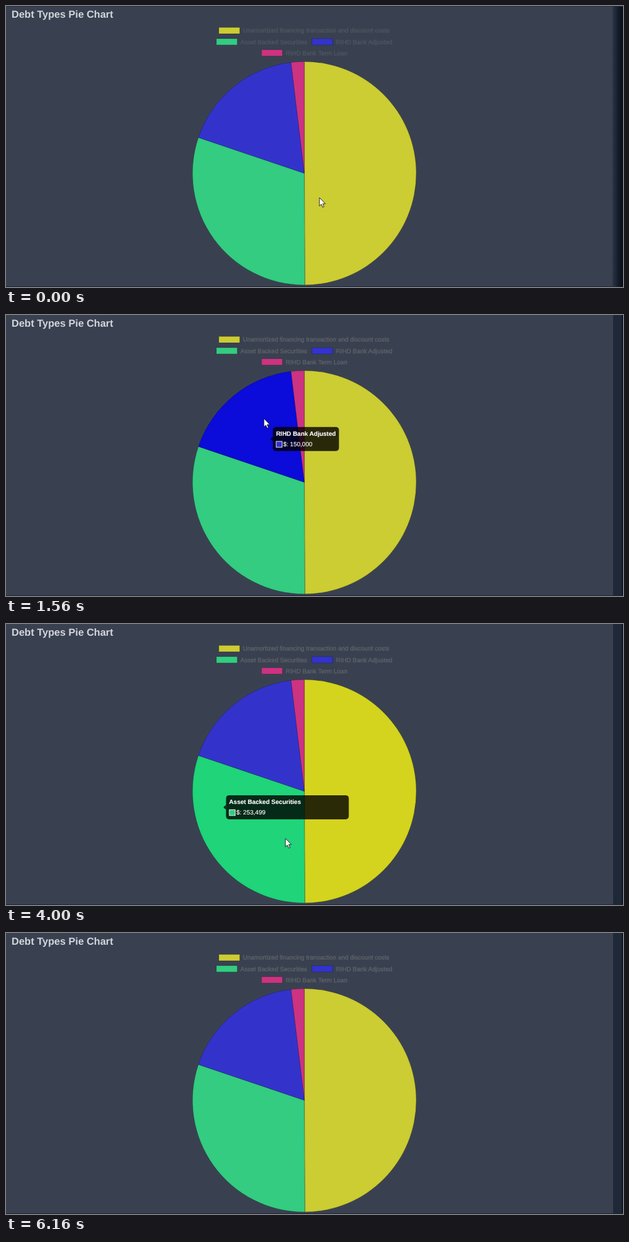
Animation, 1000 px wide and 456 px high, one loop 6700 ms. Source, as an HTML page:

```html
<!DOCTYPE html>
<html lang="en">
<head>
<meta charset="utf-8">
<title>Debt Types Pie Chart</title>
<style>
  html, body { margin: 0; width: 100%; height: 100%; overflow: hidden; background: #394151; }
  svg { display: block; width: 1000px; height: 456px; }
  text { font: 10.03px "Liberation Sans", Arial, sans-serif; text-rendering: geometricPrecision; }
  .heading { font-size: 16.5px; font-weight: bold; fill: #d3d6da; }
  .legend text { fill: #62666a; stroke: #62666a; stroke-width: .25; }
  .edge { stroke: #000; stroke-opacity: .24; stroke-width: .9; }
  .tip text { fill: #fff; stroke: #fff; stroke-width: .15; }
  .tip .name { font-weight: bold; }
</style>
</head>
<body>
<svg id="stage" viewBox="0 0 1000 456">
  <defs>
    <linearGradient id="shade">
      <stop offset="0" stop-color="#2b3444"/>
      <stop offset=".6" stop-color="#121a28"/>
      <stop offset="1" stop-color="#080d16"/>
    </linearGradient>
  </defs>
  <rect width="1000" height="456" fill="#394151"/>
  <rect x="984" width="16" height="456" fill="#1f2837"/>
  <rect x="998" width="2" height="456" fill="#0e1624"/>
  <rect y="455" width="1000" height="1" fill="#1c2431"/>
  <g id="soft">
    <rect x="983" width="17" height="456" fill="url(#shade)"/>
    <rect width="1000" height="1" fill="#262e3b"/>
  </g>
  <text class="heading" x="9" y="19.3">Debt Types Pie Chart</text>
  <g id="legend" class="legend"></g>
  <g id="pie"></g>
  <g id="tip" class="tip">
    <rect id="panel" height="39" rx="5" fill-opacity=".8"/>
    <path id="caret" fill-opacity=".8"/>
    <text id="name" class="name"></text>
    <rect id="swatch" width="9.6" height="9.6" stroke="#fff" stroke-width=".9"/>
    <text id="amount"></text>
  </g>
  <path id="cursor" d="M0 0V13.6L3.1 10.8 5.2 15.6 7.4 14.7 5.3 9.9H9.6Z"
        fill="#fff" stroke="#111" stroke-width=".9"/>
</svg>
<script>
const LOOP = 6700, CX = 483.6, CY = 271.5, R = 181.3, CARET = 4.2;
const $ = id => document.getElementById(id);

const slices = [
  { name: 'Unamortized financing transaction and discount costs', value: 418268, hue: 60, key: [345, 34.8] },
  { name: 'Asset Backed Securities', value: 253499, hue: 150, key: [341, 53] },
  { name: 'RIHD Bank Adjusted', value: 150000, hue: 240, key: [495.8, 53] },
  { name: 'RIHD Bank Term Loan', value: 15967, hue: 330, key: [414.2, 71] }
];

// start time, slice (-1 for none), duration
const hovers = [[110, 2, 190], [2208, 3, 400], [2909, 0, 400], [3939, 1, 400], [5280, -1, 400]];

// time, x, y of the pointer tip
const track = [
  [0, 508, 311], [110, 508, 311], [300, 430, 210], [970, 430, 210],
  [1560, 418, 168], [1660, 418, 168], [2208, 468, 144], [2260, 473, 144], [2340, 473, 144],
  [2909, 484, 144], [3120, 530, 144], [3510, 532, 250], [3790, 532, 250],
  [3939, 484, 330], [4000, 453, 348], [4460, 418, 344], [4670, 418, 344],
  [5220, 422, 425], [5330, 425, 462], [LOOP, 425, 462]
];

const lerp = (a, b, p) => a + (b - a) * p;
const clamp = v => Math.min(1, Math.max(0, v));
const easeOut = p => 1 - (1 - p) ** 4;
const tint = (hue, p) => `hsl(${hue} ${60 + 30 * p}% ${50 - 5 * p}%)`;

function add(parent, tag, attrs, text = '') {
  const el = document.createElementNS('http://www.w3.org/2000/svg', tag);
  set(el, attrs);
  el.textContent = text;
  return parent.appendChild(el);
}

function set(el, attrs) {
  for (const k in attrs) el.setAttribute(k, attrs[k]);
}

function polar(turn, r) {
  const a = turn * 2 * Math.PI;
  return [CX + r * Math.sin(a), CY - r * Math.cos(a)];
}

const total = slices.reduce((sum, s) => sum + s.value, 0);
let turn = 0;
for (const s of slices) {
  const span = s.value / total;
  const fill = tint(s.hue, 0);
  s.el = add($('pie'), 'path', {
    class: 'edge', fill,
    d: `M${CX} ${CY}L${polar(turn, R)}A${R} ${R} 0 ${span > .5 ? 1 : 0} 1 ${polar(turn + span, R)}Z`
  });
  const [x, y] = s.key;
  add($('legend'), 'rect', { class: 'edge', x, y, width: 33.8, height: 10.2, fill });
  add($('legend'), 'text', { x: x + 39, y: y + 8.6 }, s.name);

  // resting place of this slice's tooltip
  const [px, py] = polar(turn + span / 2, R / 2);
  $('name').textContent = s.name;
  s.w = $('name').getComputedTextLength() + 10;
  s.flip = s.hue === 60;
  s.x = s.flip ? px - 2 - CARET - s.w : px + 2 + CARET;
  s.y = py;
  turn += span;
}

function drawTip(now, from, p, alpha) {
  const x = lerp(from.x, now.x, p), y = lerp(from.y, now.y, p), w = lerp(from.w, now.w, p);
  const side = now.flip ? x + w : x, out = now.flip ? CARET : -CARET;
  set($('tip'), { opacity: alpha });
  set($('panel'), { x, y: y - 19.5, width: w });
  set($('caret'), { d: `M${side} ${y - CARET}l${out} ${CARET}l${-out} ${CARET}Z` });
  set($('name'), { x: x + 5, y: y - 5.2 });
  set($('swatch'), { x: x + 5.3, y: y + 3.9, fill: tint(now.hue, 0) });
  set($('amount'), { x: x + 16.6, y: y + 12.1 });
  $('name').textContent = now.name;
  $('amount').textContent = '$: ' + now.value.toLocaleString('en-US');
}

function draw(t) {
  const n = hovers.findLastIndex(h => t >= h[0]);
  const [start, on, time] = n < 0 ? [0, -1, 1] : hovers[n];
  const was = n > 0 ? hovers[n - 1][1] : -1;
  const p = easeOut(clamp((t - start) / time));

  slices.forEach((s, i) => {
    const glow = i === on ? p : i === was ? 1 - p : 0;
    set(s.el, { fill: tint(s.hue, glow), 'stroke-opacity': .24 + .2 * glow });
  });

  const now = slices[on] || slices[was];
  if (now) drawTip(now, slices[was] || now, p, on < 0 ? 1 - p : was < 0 ? p : 1);
  else set($('tip'), { opacity: 0 });

  const k = track.findIndex(c => c[0] > t);
  const [a, b] = [track[k - 1], track[k]];
  const q = (t - a[0]) / (b[0] - a[0]);
  set($('cursor'), { transform: `translate(${lerp(a[1], b[1], q)} ${lerp(a[2], b[2], q)})` });

  // the picture opens slightly dim and clears
  const clear = clamp((t - 100) / 190);
  set($('soft'), { opacity: 1 - clear });
  set($('legend').style ? $('legend') : $('legend'), { 'data-clear': clear > .99 });
  for (const label of $('legend').querySelectorAll('text')) set(label, { opacity: lerp(.6, 1, clear) });
}

const begin = performance.now();
function frame() {
  draw((performance.now() - begin) % LOOP);
  requestAnimationFrame(frame);
}
frame();
</script>
</body>
</html>
```
